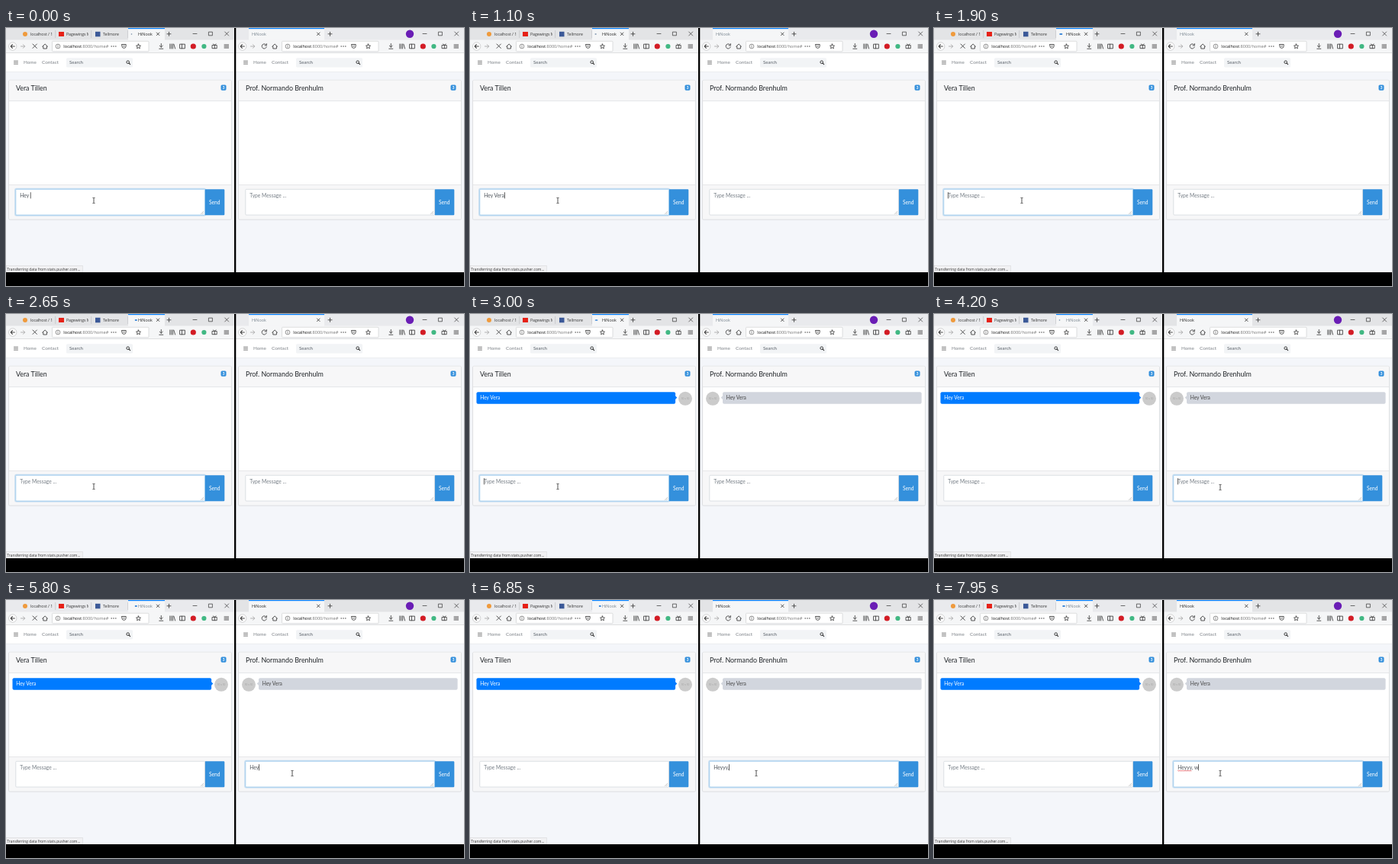
Animation, 600 px wide and 338 px high, one loop 8 s. Source, as an HTML page:

```html
<!DOCTYPE html>
<html lang="en">
<head>
<meta charset="utf-8">
<title>Chat in two windows</title>
<style>
html, body { margin: 0; width: 100%; height: 100%; overflow: hidden; background: #000; }
svg { display: block; width: 100%; height: 100%; }
text { white-space: pre; }
.ui { font-family: "Open Sans", "Noto Sans", sans-serif; }
.page { font-family: Lato, "Open Sans", sans-serif; }
.icon { fill: none; stroke: #444; stroke-width: .9; stroke-linecap: round; stroke-linejoin: round; }
</style>
</head>
<body>
<svg id="stage" viewBox="0 0 600 338" preserveAspectRatio="none"></svg>
<script>
const LOOP = 8000, SHIFT = 301, FOCUS_AT = 4050;
const PLACEHOLDER = "Type Message ...";
const FIELD_FONT = 6.7;
const stage = document.getElementById("stage");
const $ = id => document.getElementById(id);

const rect = (x, y, w, h, fill, more = "") =>
  `<rect x="${x}" y="${y}" width="${w}" height="${h}" fill="${fill}" ${more}/>`;
const dot = (x, y, r, fill, more = "") =>
  `<circle cx="${x}" cy="${y}" r="${r}" fill="${fill}" ${more}/>`;
const icon = (d, more = "") => `<path class="icon" d="${d}" ${more}/>`;
const label = (x, y, size, fill, str, cls = "page", more = "") =>
  `<text class="${cls}" x="${x}" y="${y}" font-size="${size}" fill="${fill}" ${more}>${str}</text>`;
const menuIcon = (x, y, w, color) =>
  icon([-2, 0, 2].map(d => `M${x} ${y + d}h${w}`).join(""), `style="stroke:${color}"`);

function controls() {
  return icon("M245 7.5h5M265.8 5.2h4.6v4.6h-4.6zM286.7 5l5 5m0-5l-5 5", 'style="stroke:#333;stroke-width:.7"');
}

function leftTabs() {
  const tab = (x, color, name, shape) =>
    shape + label(x + 15, 10, 5.2, "#333", name, "ui", `clip-path="url(#tab${x})"`) +
    `<clipPath id="tab${x}"><rect x="${x}" y="0" width="44" height="15"/></clipPath>` +
    rect(x + 47.5, 3, .6, 10, "#b9babd");
  return tab(17, "", "localhost / 1", dot(25, 8, 3, "#ef9a3c")) +
    tab(64, "", "Pagewings M", rect(69, 5, 7, 6, "#e62117")) +
    tab(112, "", "Tellmore", rect(117, 4.8, 6.5, 6.5, "#3b5998")) +
    rect(160, 0, 48, 16, "#f5f6f7") + rect(160, 0, 48, 1.2, "#0a84ff") +
    '<ellipse id="spinner" cy="8"/>' +
    label(173, 10, 5.4, "#222", "HiNook", "ui", 'id="title0"') +
    icon("M197.3 6l3.6 3.6m0-3.6l-3.6 3.6M211 7.8h5m-2.5-2.5v5");
}

function rightTabs() {
  return rect(17, 0, 99, 16, "#f5f6f7") + rect(17, 0, 99, 1.2, "#0a84ff") +
    label(21, 10, 5.4, "#222", "HiNook", "ui", 'id="title1"') +
    icon("M106.5 6l3.6 3.6m0-3.6l-3.6 3.6M121 7.8h5m-2.5-2.5v5") +
    dot(228, 7.8, 5.2, "#6a1db5");
}

function toolbar(loading) {
  const reload = loading ? "M35 21l5.4 5.4m0-5.4L35 26.4" : "M39.9 22.2a3.1 3.1 0 1 0 .4 2.6M40.4 20.6v2.3h-2.3";
  return rect(0, 15.5, 299, 17.5, "#f5f6f7") + rect(0, 32.4, 299, .6, "#cfd0d2") +
    dot(8.7, 24, 5.2, "#fff", 'stroke="#b5b5b8" stroke-width=".6"') +
    icon("M11.4 24H6.2m2.2-2.3L6.2 24l2.2 2.3", 'style="stroke-width:1.1"') +
    icon("M19.5 24h5.2m-2.2-2.3l2.2 2.3-2.2 2.3", 'style="stroke:#aaa"') +
    icon(reload) + icon("M47.7 24.2l3.4-3.2 3.4 3.2M48.8 23.8v3.2h4.6v-3.2") +
    rect(60.5, 17.3, 126.5, 13.4, "#fff", 'rx="1" stroke="#c8c9cc" stroke-width=".6"') +
    dot(68, 24, 2.9, "none", 'stroke="#666" stroke-width=".7"') + rect(67.6, 23.4, .8, 2.2, "#666") + rect(67.6, 22, .8, .8, "#666") +
    `<text class="ui" x="75.3" y="26" font-size="5.65" fill="#777"><tspan fill="#111">localhost</tspan>:8000/home#</text>` +
    [138.2, 141, 143.8].map(x => dot(x, 24, .8, "#555")).join("") +
    icon("M151.8 21.5h5.4v2.2a2.7 2.7 0 0 1-5.4 0zM153.4 23.2l1.1 1 1.1-1") +
    icon("M173.5 21l.9 2 2.1.2-1.6 1.5.5 2.1-1.9-1.1-1.9 1.1.5-2.1-1.6-1.5 2.1-.2z") +
    icon("M203.3 20.5v4.6m-2-1.9l2 1.9 2-1.9M200.8 27.2h5") +
    icon("M214.8 21v6m1.9-6v6m1.9-6v6m1.3-5.8l1.7 5.8") +
    icon("M228 21.2h6.4v5.6H228zM230.5 21.2v5.6") +
    dot(245.3, 24, 3.6, "#d31c25") + dot(259.4, 24, 3.1, "#41b883") +
    icon("M270.4 22.5h5.8v4.2h-5.8zM273.3 22.5v4.2M271.6 20.8l1.7 1.7 1.7-1.7") +
    menuIcon(286, 24, 5.6, "#444");
}

function page(i, name) {
  return rect(0, 33, 299, 24.5, "#fff") + rect(0, 57.2, 299, .6, "#e4e7eb") +
    menuIcon(10.5, 45.2, 5, "#777") +
    label(23, 47.3, 6.35, "#7d8288", "Home") + label(47, 47.3, 6.35, "#7d8288", "Contact") +
    rect(79, 39.2, 87, 12.4, "#f2f4f6", 'rx="1.5"') + label(83, 47.2, 6.1, "#596068", "Search") +
    dot(159.7, 44.7, 1.8, "none", 'stroke="#333" stroke-width="1"') + icon("M161.1 46.1l1.6 1.6", 'style="stroke:#333;stroke-width:1.1"') +
    rect(3, 68.8, 293, 183, "#000", 'rx="2" opacity=".06"') +
    rect(3.6, 68.3, 291.8, 182.4, "#fff", 'rx="1.5" stroke="#d5d7da" stroke-width=".7"') +
    rect(4, 68.7, 291, 27, "#f7f7f8") + rect(4, 95.4, 291, .6, "#d9dbde") +
    rect(4, 205.6, 291, 44.7, "#f7f7f8") + rect(4, 205.4, 291, .6, "#d9dbde") +
    label(12.9, 82.4, 8.9, "#22262a", name) +
    rect(281.5, 74.5, 7, 7.2, "#3490dc", 'rx="1.6"') +
    label(285, 80.1, 5.3, "#fff", "3", "page", 'font-weight="700" text-anchor="middle"') +
    rect(260.3, 211.2, 26, 34, "#3490dc", 'rx="1.2"') +
    label(273.3, 230.7, 6.7, "#fff", "Send", "page", 'text-anchor="middle"') +
    rect(12, 210.5, 249.3, 35.3, "none", `id="glow${i}" rx="1.6" stroke="#3490dc" stroke-opacity=".25" stroke-width="1.6"`) +
    rect(12.8, 211.3, 247.7, 33.7, "#fff", `id="field${i}" rx="1" stroke-width=".7"`) +
    icon("M255.4 243.6l3.4-3.4m-1.5 3.4l1.5-1.5", 'style="stroke:#999;stroke-width:.5"') +
    label(18.3, 221.7, FIELD_FONT, "", "", "page", `id="text${i}"`) +
    rect(0, 215.2, .7, 8.2, "#222", `id="caret${i}"`);
}

function bubble(i) {
  const x = i ? 30 : 8.5, face = i ? 17 : 282;
  const fill = i ? "#d2d6de" : "#007bff";
  const tip = i ? "M30.3 107l-2.6 2.6 2.6 2.6z" : "M268.7 107l2.6 2.6-2.6 2.6z";
  return `<g id="msg${i}">` + rect(x, 102.2, 260.6, 15.6, fill, 'rx="2"') + `<path d="${tip}" fill="${fill}"/>` +
    label(x + 4.8, 112.3, 6.6, i ? "#444" : "#fff", "Hey Vera") +
    dot(face, 110.8, 9, "#cbcbcb") +
    label(face, 112, 3.2, "#a2a2a2", "50 x 50", "ui", 'text-anchor="middle"') + "</g>";
}

function browser(i, name) {
  return `<g transform="translate(${i * SHIFT})">` +
    rect(0, 0, 299, 320, "#f4f6fa") + rect(0, 0, 299, 16, "#e6e7ea", `id="bar${i}"`) +
    (i ? rightTabs() : leftTabs()) + controls() + toolbar(!i) + page(i, name) + bubble(i);
}

stage.innerHTML = rect(0, 0, 600, 338, "#000") +
  browser(0, "Vera Tillen") +
  rect(0, 311.3, 100.5, 8.7, "#f1f1f3", 'stroke="#d3d3d6" stroke-width=".5"') +
  label(1.3, 317.6, 4.9, "#333", "Transferring data from stats.pusher.com...", "ui") + "</g>" +
  browser(1, "Prof. Normando Brenhulm") +
  '<path id="squiggle" fill="none" stroke="#e0262d" stroke-width=".7"/></g>' +
  rect(299, 0, 2.3, 338, "#000") + rect(0, 320, 600, 18, "#000") +
  '<path id="beam" d="M-1.5-3.6h1l.5.5.5-.5h1M0-3.1v6.2M-1.5 3.6h1l.5-.5.5.5h1" fill="none" stroke="#222" stroke-width=".8"/>' +
  '<path id="arrow" d="M0 0v7.2l1.7-1.5 1.2 2.6 1.1-.5-1.2-2.5h2.3z" fill="#fff" stroke="#222" stroke-width=".6"/>';

// Each entry: time, text in the field from then on
const typed = [
  [[0, "Hey "], [250, "Hey V"], [450, "Hey Ve"], [650, "Hey Ver"], [1000, "Hey Vera"], [1900, ""]],
  [[FOCUS_AT, ""], [5300, "H"], [5500, "He"], [5700, "Hey"], [5950, "Heyy"], [6150, "Heyyy"],
   [6650, "Heyyy,"], [7050, "Heyyy, "], [7700, "Heyyy, w"]]
];
const pointer = [[3050, 115, 226], [3250, 190, 250], [3450, 285, 257], [3650, 345.5, 250], [3900, 375, 227]];

const pen = document.createElement("canvas").getContext("2d");
function textWidth(str) {
  pen.font = `67px Lato, "Open Sans", sans-serif`;
  return pen.measureText(str).width * FIELD_FONT / 67;
}
const show = (id, on) => $(id).setAttribute("visibility", on ? "visible" : "hidden");
const set = (id, attrs) => { for (const k in attrs) $(id).setAttribute(k, attrs[k]); };

function drawField(i, t, focused) {
  let start = 0, str = "";
  for (const [at, s] of typed[i]) if (t >= at) { start = at; str = s; }
  $("text" + i).textContent = str || PLACEHOLDER;
  set("text" + i, { fill: str ? "#495057" : "#747c84" });
  set("field" + i, { stroke: focused ? "#8fc3ea" : "#ced4da" });
  set("caret" + i, { x: 18.2 + textWidth(str) });
  show("caret" + i, focused && (t - start) % 1000 < 500);
  show("glow" + i, focused);
  set("title" + i, { fill: focused ? "#222" : "#74808c" });
  set("bar" + i, { fill: focused ? "#e3e4e6" : "#e9eaed" });
}

function drawPointer(t) {
  let [, x, y] = pointer[0];
  for (let k = 1; k < pointer.length; k++) {
    const [t0, x0, y0] = pointer[k - 1], [t1, x1, y1] = pointer[k];
    if (t < t0) break;
    const p = Math.min(1, (t - t0) / (t1 - t0));
    x = x0 + (x1 - x0) * p;
    y = y0 + (y1 - y0) * p;
  }
  const u = x > SHIFT ? x - SHIFT : x;
  const inField = u > 13 && u < 260 && y > 211 && y < 245;
  show("beam", inField);
  show("arrow", !inField);
  set(inField ? "beam" : "arrow", { transform: `translate(${x} ${y})` });
}

function drawSpinner(t) {
  const a = t % 1050 / 1050 * 2 * Math.PI;
  set("spinner", {
    cx: 167.4 - 2.9 * Math.cos(a),
    rx: .8 + 1.3 * Math.abs(Math.sin(a)) + .3 * (1 - Math.cos(a)),
    ry: .8 + .15 * (1 - Math.cos(a)),
    fill: Math.cos(a) > .8 ? "#6c86a3" : "#2f7fd6"
  });
}

function draw(t) {
  const right = t >= FOCUS_AT;
  drawField(0, t, !right);
  drawField(1, t, right);
  show("msg0", t >= 2850);
  show("msg1", t >= 2950);
  show("squiggle", t >= 7050);
  const waves = Math.round(textWidth("Heyyy") / 2);
  set("squiggle", { d: "M18.3 223.7" + "q.5-.9 1 0t1 0".repeat(waves) });
  drawPointer(t);
  drawSpinner(t);
}

const begin = performance.now();
function tick() {
  draw((performance.now() - begin) % LOOP);
  requestAnimationFrame(tick);
}
tick();
</script>
</body>
</html>
```
